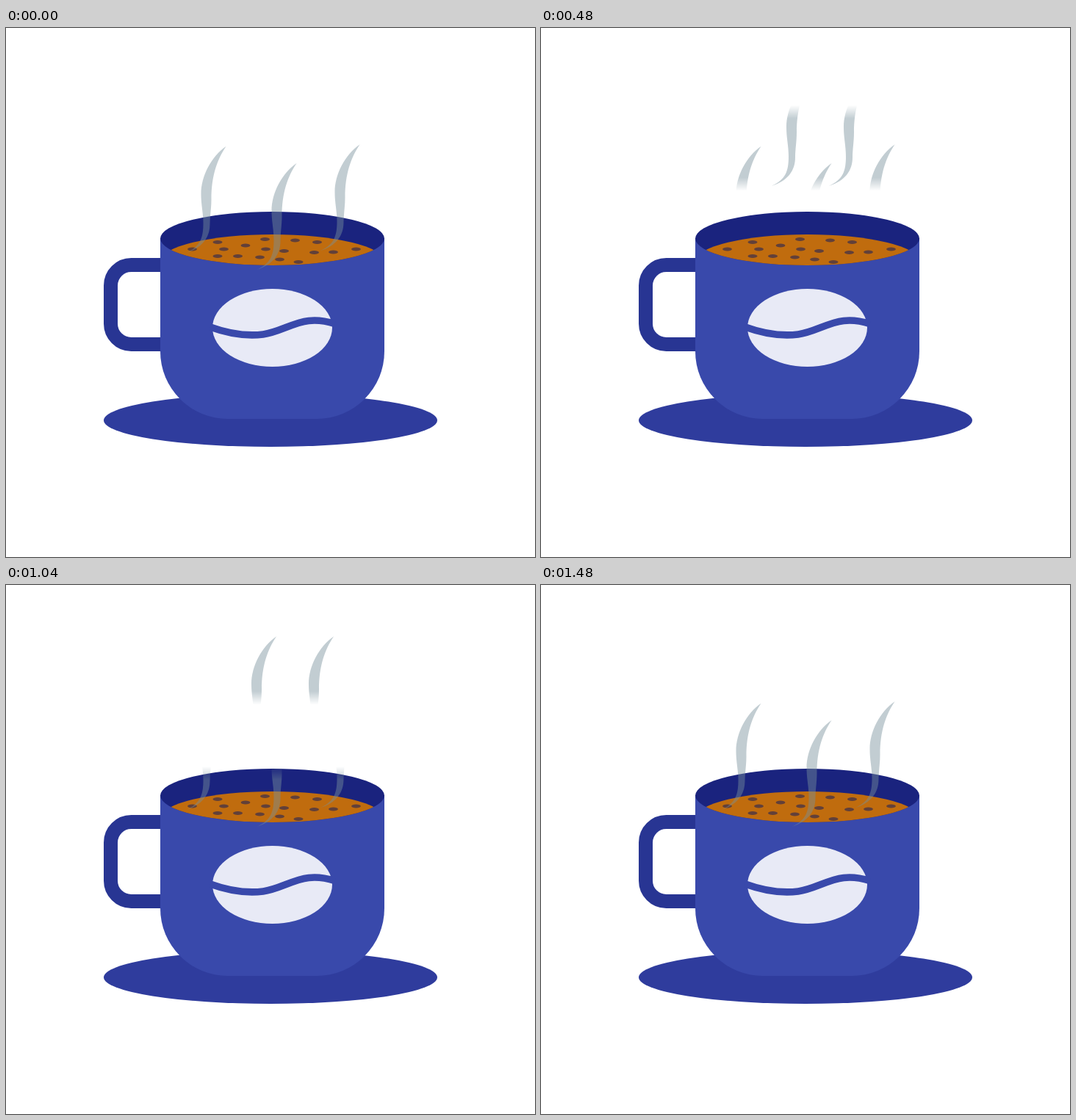
Animation, 720 px wide and 720 px high, one loop 1.52 s. Source, as an HTML page:

```html
<!DOCTYPE html>
<html lang="en">
<head>
<meta charset="utf-8">
<title>Steaming cup</title>
<style>
  html, body { margin: 0; width: 100%; height: 100%; overflow: hidden; background: #fff; }
  svg { display: block; width: 100%; height: 100%; }
</style>
</head>
<body>
<svg viewBox="0 0 720 720">
  <defs>
    <path id="wisp" d="M0 0C-20 14-34 40-34 65C-34 80-31 90-31 105C-31 125-35 136-54 145C-32 138-22 124-22 106C-22 95-20 85-20 72C-20 40-12 18 0 0Z"/>
    <clipPath id="rim"><ellipse cx="362.5" cy="286.5" rx="152.5" ry="36.5"/></clipPath>
  </defs>

  <ellipse cx="360" cy="534" rx="227" ry="36" fill="#2f3c9d"/>
  <path d="M215 322.5H170.500A28 28 0 0 0 142.500 350.500V402.500A28 28 0 0 0 170.500 430.500H215" fill="none" stroke="#283593" stroke-width="19"/>
  <path d="M210 286.500H515V440A92 92 0 0 1 423 532H302A92 92 0 0 1 210 440Z" fill="#3949ab"/>

  <ellipse cx="362.5" cy="286.5" rx="152.5" ry="36.5" fill="#1a237e"/>
  <g id="coffee" clip-path="url(#rim)">
    <ellipse cx="362.5" cy="317.5" rx="152.5" ry="36.5" fill="#c06c0e"/>
  </g>

  <ellipse cx="362.5" cy="408" rx="81.5" ry="53" fill="#e8eaf6"/>
  <path d="M278 407C300 415 325 420 350 417C372 414 390 401 412 398.500C424 397 436 399 448 402.500" fill="none" stroke="#3949ab" stroke-width="9.7"/>

  <g id="steam" fill="#78909c" fill-opacity=".45"></g>
</svg>
<script>
  const LOOP = 1520, STEP = 40, FEATHER = 18;

  const specks = [
    [288, 291.5], [352.5, 287.5], [393.5, 289], [423.5, 291.5], [253.5, 301], [296.5, 301],
    [326, 296], [353.5, 301], [378.5, 303.5], [419.5, 305.5], [445.5, 305], [476.5, 301],
    [288, 310.5], [315.5, 310.5], [345.5, 312], [372.5, 315], [398, 318.5]
  ];

  // A soft-edged window rises through each group: its top reveals, its bottom erases.
  const groups = [
    { tips: [[299.5, 161], [395.5, 184], [481.5, 158.5]], from: 328, height: 234, speed: 0.27, start: 740 },
    { tips: [[368, 70], [446, 70]], from: 215, height: 186, speed: 0.229, start: 0 }
  ];

  function add(parent, tag, attrs) {
    const el = document.createElementNS('http://www.w3.org/2000/svg', tag);
    for (const key in attrs) el.setAttribute(key, attrs[key]);
    return parent.appendChild(el);
  }

  const defs = document.querySelector('defs');
  const coffee = document.getElementById('coffee');
  const steam = document.getElementById('steam');

  for (const [cx, cy] of specks) add(coffee, 'ellipse', { cx, cy, rx: 6.4, ry: 2.6, fill: '#624039' });

  groups.forEach((group, i) => {
    const edge = FEATHER / group.height;
    const fade = add(defs, 'linearGradient', { id: 'fade' + i, x1: 0, y1: 0, x2: 0, y2: 1 });
    [[0, 0], [edge, 1], [1 - edge, 1], [1, 0]].forEach(([offset, alpha]) =>
      add(fade, 'stop', { offset, 'stop-color': '#fff', 'stop-opacity': alpha }));

    const mask = add(defs, 'mask', {
      id: 'mask' + i, maskUnits: 'userSpaceOnUse', x: 0, y: 0, width: 720, height: 720
    });
    group.pane = add(mask, 'rect', { x: 0, width: 720, height: group.height, fill: `url(#fade${i})` });

    const layer = add(steam, 'g', { mask: `url(#mask${i})` });
    for (const [x, y] of group.tips) add(layer, 'use', { href: '#wisp', x, y });
  });

  function draw(time) {
    const t = Math.floor(time / STEP) * STEP;
    for (const { pane, from, speed, start } of groups) {
      const age = (t - start + LOOP) % LOOP;
      pane.setAttribute('y', from - speed * age);
    }
  }

  let origin;
  function tick(now) {
    origin ??= now;
    draw((now - origin) % LOOP);
    requestAnimationFrame(tick);
  }
  draw(0);
  requestAnimationFrame(tick);
</script>
</body>
</html>
```
